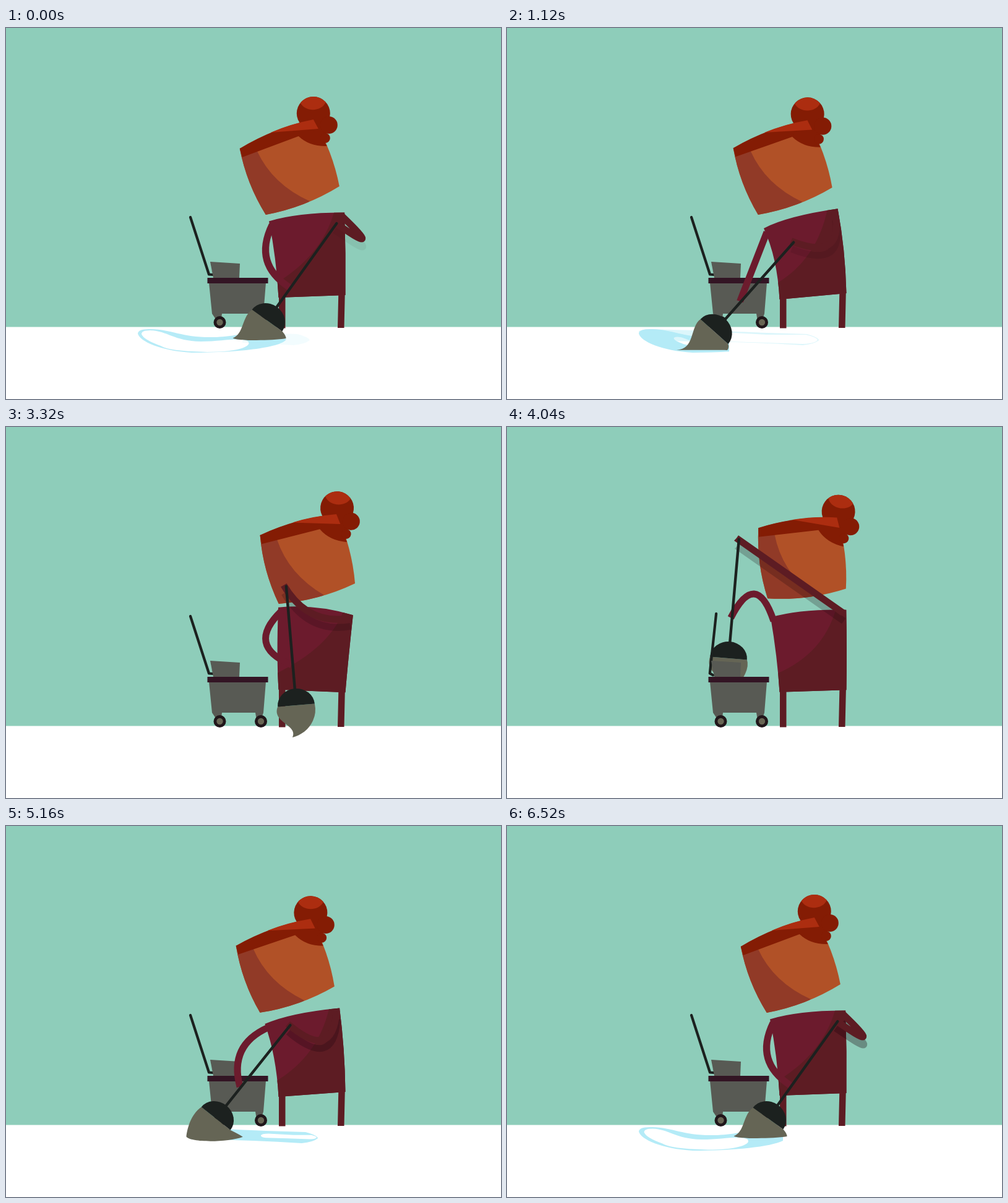
Animation of 800x600 px, one loop 6560 ms. Source, as an HTML page with a canvas:

```html
<!DOCTYPE html>
<html lang="en">
<head>
<meta charset="utf-8">
<title>Mopping</title>
<style>
html, body { margin: 0; width: 100%; height: 100%; overflow: hidden; background: #fff; }
canvas { display: block; width: 800px; height: 600px; }
</style>
</head>
<body>
<canvas id="stage" width="800" height="600"></canvas>
<script>
const ctx = document.getElementById('stage').getContext('2d');
const LOOP = 6560, STEP = 40, SHAFT = 193, DOME = 30;
const DARK = '#1c211f', SHIRT = '#6c1b2d', SHADE = '#5d1c23', GREY = '#585a54';

// x, y, tilt: mop; drag: how the strings trail; hang: mop off the floor;
// head: head angle; lean: body position. Everything else follows from these.
const back  = { x: 422, y: 473, tilt: 35.6, drag: -.2, hang: 0, head: 0, lean: 17 };
const reach = { x: 259.5, y: 463.5, tilt: 60, drag: 1, hang: 0, head: 3.2, lean: 0 };
const glide = { x: 335, y: 491, tilt: 41.6, drag: -1, hang: 0, head: 1, lean: 7 };
const rest  = { x: 444, y: 482, tilt: 7.8, drag: .5, hang: 0, head: 22.2, lean: 24 };
const nod   = { ...rest, head: 6.5 };
const lift  = { x: 469, y: 450, tilt: -4.8, drag: 0, hang: 1, head: 6.2, lean: 32 };
const over  = { ...lift, x: 358, y: 325, tilt: 5, head: 9, lean: 26 };
const press = { ...over, y: 374, head: 14, lean: 18 };
const land  = { x: 430, y: 484, tilt: 9.8, drag: .6, hang: 0, head: 0, lean: 24 };

const track = [
  [0, back], [640, reach], [720, reach], [1120, glide], [1480, back], [1760, rest],
  [2600, rest], [2960, nod], [3200, nod], [3320, lift], [3560, over], [3760, press],
  [4080, press], [4240, over], [4680, land], [5600, reach], [5720, reach],
  [6120, glide], [6520, back], [LOOP, back]
].map(([t, pose]) => ({ t, pose }));

const clamp = x => Math.max(0, Math.min(1, x));
const ramp = (t, a, b) => clamp((t - a) / (b - a));
const ease = x => x * x * (3 - 2 * x);
const lerp = (a, b, k) => a + (b - a) * k;
const mix = (p, q, k) => p.map((v, i) => lerp(v, q[i], k));

function slope(i, key) {
  if (!i || i === track.length - 1) return 0;
  const d = k => (track[k + 1].pose[key] - track[k].pose[key]) / (track[k + 1].t - track[k].t);
  const a = d(i - 1), b = d(i);
  return a * b <= 0 ? 0 : 2 * a * b / (a + b);
}

// Monotone cubic interpolation of the pose
function sample(t) {
  let i = 0;
  while (t >= track[i + 1].t) i++;
  const a = track[i], b = track[i + 1], h = b.t - a.t, k = (t - a.t) / h;
  const out = {};
  for (const key in a.pose) {
    out[key] = lerp(a.pose[key], b.pose[key], ease(k)) +
      h * k * (1 - k) * ((1 - k) * slope(i, key) - k * slope(i + 1, key));
  }
  return out;
}

const P = d => new Path2D(d);
function fill(path, color) {
  ctx.fillStyle = color;
  ctx.fill(path);
}
function stroke(path, color, width, cap = 'butt') {
  ctx.strokeStyle = color;
  ctx.lineWidth = width;
  ctx.lineCap = cap;
  ctx.lineJoin = 'round';
  ctx.stroke(path);
}
function disc(x, y, r, color) {
  const p = new Path2D();
  p.arc(x, y, r, 0, 7);
  fill(p, color);
}
function clipped(path, draw) {
  ctx.save();
  ctx.clip(path);
  draw();
  ctx.restore();
}
function rotated(x, y, angle, draw) {
  ctx.save();
  ctx.translate(x, y);
  ctx.rotate(angle);
  draw();
  ctx.restore();
}

// Head parts, relative to the lower left corner of the face
const head = {
  skin: P('M-42-107Q-31-50 0 0Q64-12 119-46Q108-103 78-153Q14-141-42-107Z'),
  shade: P('M-14-103Q11-49 71-22L19 29L-61-1V-111Z'),
  band: P('M-42-107Q14-141 77-154L85-139L53-127L-38-93Z'),
  back: P('M53-127Q71-110 99-111L95-118L103-151L76-161Z'),
  shine: P('M8-133Q40-147 77-154L85-139Z'),
  bunShine: P('M56-181C63-166 90-166 97-182A27 27 0 0 0 56-181Z')
};
const tub = P('M328 412H420L416 462L412 474H405L403 462H349L348 470L341 474L333 462Z');
const wringer = P('M330 378L378 381L377 404H335Z');
const lever = P('M-30-92L0 .5L6 1');
const band = {
  outer: P('M213 490Q214 502 230 506L320 507Q400 508 478 513Q497 511 504 505Q503 500 484 495L420 493Q360 490 225 487Z'),
  inner: P('M303 498Q305 491 330 491L420 496L483 496Q500 500 502 504Q500 510 478 511Q400 508 320 506Q304 504 303 498Z')
};
const loop = {
  outer: P('M213 494Q214 486 235 487C270 488 285 501 335 500C370 499 385 492 410 494Q440 498 453 503C448 516 380 525 300 525C250 522 216 507 213 494Z'),
  inner: P('M219 495Q219 489 233 489C262 490 270 506 315 507C350 507 375 500 390 506C400 513 380 524 325 524C290 523 262 521 250 514Q222 504 219 495Z')
};

function puddle(shape, alpha, from, to, dry, px, py, dx = 0) {
  if (alpha <= 0) return;
  const ring = new Path2D(shape.outer);
  if (dry > 0) {
    ring.addPath(shape.inner, new DOMMatrix().translate(px, py).scale(dry).translate(-px, -py));
  }
  ctx.save();
  ctx.beginPath();
  ctx.rect(from, 484, to - from, 60);
  ctx.clip();
  ctx.translate(dx, 0);
  ctx.globalAlpha = alpha;
  ctx.fillStyle = '#b4ebf7';
  ctx.fill(ring, 'evenodd');
  ctx.restore();
}

// One pass to the left and back; the water dries afterwards.
function water(t, mopX, start, turn, end, gone) {
  if (t < start || t > gone) return;
  const wet = ramp(t, start, start + 120) * (1 - ramp(t, turn, end - 40));
  puddle(band, wet, t < turn ? mopX - 40 : 0, 800,
    ramp(t, start + 120, turn), 502, 503, -14 * (1 - ramp(t, start, start + 400)));
  if (t > turn) {
    const left = ramp(t, turn, turn + 200) * (1 - ramp(t, end, gone));
    puddle(loop, left, 0, t < end ? mopX + 24 : 800, ramp(t, turn + 120, end), 306, 507);
  }
}

function drawBucket(t) {
  const pull = ease(ramp(t, 3720, 3880)) * (1 - ease(ramp(t, 4040, 4200)));
  rotated(328, 398, pull * .42, () => stroke(lever, DARK, 4.2, 'round'));
  fill(wringer, GREY);
  fill(tub, GREY);
  ctx.fillStyle = '#331524';
  ctx.fillRect(325.5, 404, 98, 9);
  for (const x of [345.5, 412]) {
    disc(x, 476, 10, '#21161a');
    disc(x, 476, 5.2, '#686553');
  }
}

// The base stays planted; the shoulders slide with the lean.
function drawBody(d, rise) {
  const up = rise / 2;
  const TL = [408 + d, 332 - 1.15 * d - up];
  const TR = [524 + 1.6 * d - .014 * d * d, 288 + .62 * d - up];
  fill(P('M441 420H451.5V485.5H441Z M537.5 420H548L546.5 485H536Z'), SHADE);
  const torso = P(`M${TL}Q${440 + 1.9 * d} ${308 - .58 * d - up} ${TR}` +
    `Q${545 + .25 * d} ${352 + .75 * d} 548.5 ${427 + .29 * d - rise}` +
    `L440.5 ${441 - .29 * d - rise}Q437 372 ${TL}Z`);
  fill(torso, SHIRT);
  clipped(torso, () => fill(P(`M${TR[0] - 15} ${TR[1] - 8}` +
    `Q${TR[0] - 28 - .3 * d} ${376 - .6 * d} 436 ${413 - 2 * rise}V460H580V270Z`), SHADE));
  return { TL, TR };
}

function drawHead(x, y, angle) {
  const hair = '#841c04', shine = '#ac2d10';
  rotated(x, y, angle * Math.PI / 180, () => {
    fill(head.skin, '#b15127');
    clipped(head.skin, () => fill(head.shade, '#913a27'));
    fill(head.band, hair);
    fill(head.back, hair);
    disc(77, -164, 27, hair);
    disc(102, -145, 14, hair);
    disc(96, -124, 8, hair);
    fill(head.shine, shine);
    fill(head.bunShine, shine);
  });
}

// A limp arm from shoulder to hand: the closer they are, the more it bows.
function arm(s, h, reach, side, out = 0) {
  const dx = s[0] - h[0], dy = s[1] - h[1], len = Math.hypot(dx, dy) || 1;
  const bow = 68 * Math.sqrt(clamp(1 - (len / reach) ** 2));
  const nx = -side * dy / len + out * bow / 68, ny = side * dx / len;
  const k = bow / Math.hypot(nx, ny);
  const c = f => {
    const [x, y] = mix(s, h, f);
    return [x + nx * k, y + ny * k];
  };
  return P(`M${s}C${c(1 / 3)} ${c(2 / 3)} ${h}`);
}

// Outline of the strings: spread on the floor, or one drop when lifted
const drop = [[-40, 28], [4, 32], [-6, 52], [7, 49], [21, 39], [27, 25], [33, 12]];
function strings(a, drag, hang) {
  const L = [-DOME * Math.cos(a), -DOME * Math.sin(a)], w = Math.sin(2 * a);
  const tail = [-54 + 7 * drag, 30 * w], toe = [33 + 12 * drag, 13 + 17 * w];
  const low = Math.max(tail[1], toe[1]) + 5 + 5 * drag;
  const spread = [
    [L[0] - 8 - 9 * w, L[1] + 4 + 8 * w], [-39 - 8 * drag, tail[1] - 8 - 7 * drag], tail,
    [tail[0] + 6, low], [toe[0] - 25, low], toe,
    [(toe[0] - L[0]) / 2 + 3, (toe[1] - L[1]) / 2 + 1]
  ];
  const [c1, c2, tip, b1, b2, end, r] = spread.map((p, i) => mix(p, drop[i], hang));
  return P(`M${L}C${c1} ${c2} ${tip}C${b1} ${b2} ${end}Q${r} ${-L[0]} ${-L[1]}Z`);
}

function drawMop(m, a) {
  ctx.save();
  ctx.translate(m.x, m.y);
  fill(strings(a, m.drag, m.hang), '#656555');
  ctx.rotate(a);
  stroke(P(`M0 ${-SHAFT}V-15`), DARK, 4.4, 'round');
  const dome = new Path2D();
  dome.ellipse(0, 0, DOME, 27, 0, Math.PI, 2 * Math.PI);
  fill(dome, DARK);
  ctx.restore();
}

function draw(t) {
  const m = sample(t);
  const a = m.tilt * Math.PI / 180, rise = 7 * m.hang;
  const top = [m.x + SHAFT * Math.sin(a), m.y - SHAFT * Math.cos(a)];
  const wringing = t >= 3560 && t < 4260;

  ctx.fillStyle = '#fff';
  ctx.fillRect(0, 0, 800, 600);
  ctx.fillStyle = '#8ecdba';
  ctx.fillRect(0, 0, 800, 483.5);

  for (const time of [t, t + LOOP]) water(time, m.x, 4560, 5740, 6540, 7240);
  water(t, m.x, -20, 740, 1480, 2040);

  if (!wringing) drawBucket(t);
  const { TL, TR } = drawBody(m.lean, rise);
  drawHead(396 + 1.4 * m.lean, 302 - .055 * m.head ** 2 - 2 * rise, m.head);

  const rightArm = arm([TR[0] - 5, TR[1] + 5], [top[0] - 4, top[1] - 2], 131, 1, .25);
  ctx.save();
  ctx.translate(1, 13);
  stroke(rightArm, `rgba(25,0,12,${lerp(.06, .32, t / LOOP)})`, 11);
  ctx.restore();
  stroke(rightArm, SHADE, 11);

  const [gx, gy] = mix(top, [m.x, m.y], .66);
  stroke(arm([TL[0] + 5, TL[1] + 6], [gx - 2, gy], 118, -1), SHIRT, 11);

  drawMop(m, a);
  if (wringing) drawBucket(t);
}

const began = performance.now();
function tick() {
  const t = (performance.now() - began) % LOOP;
  draw(Math.floor(t / STEP) * STEP);
  requestAnimationFrame(tick);
}
tick();
</script>
</body>
</html>
```
